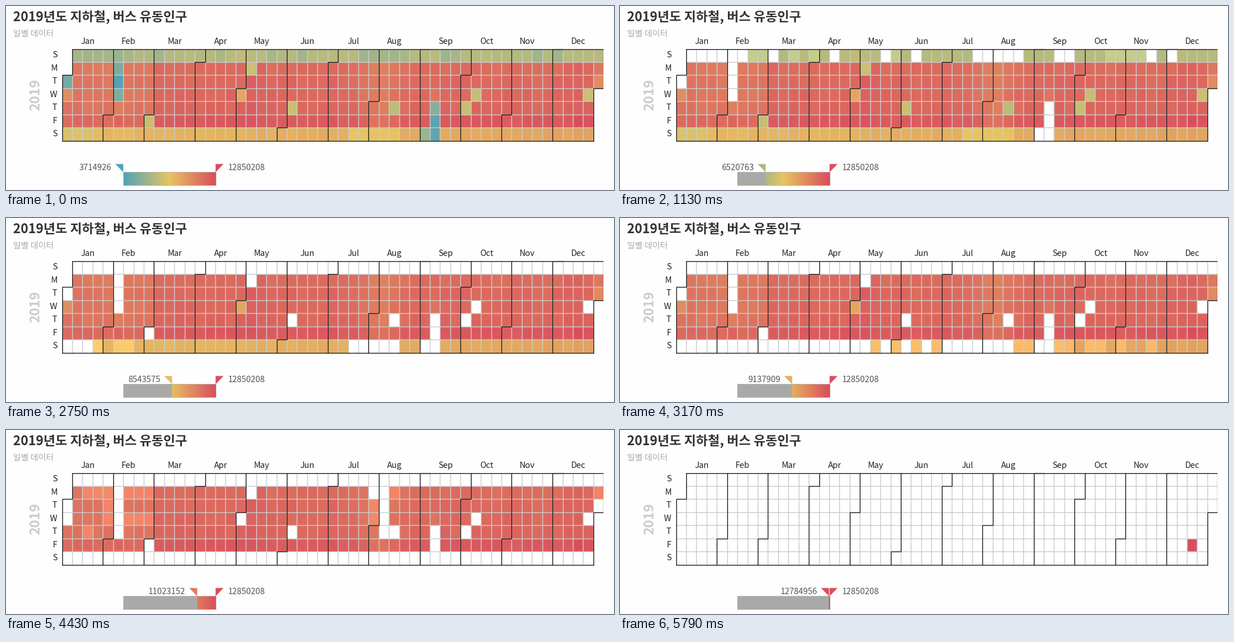
Animation, 1037 px wide and 315 px high, one loop 8000 ms. Source, as a matplotlib script:

```python
import random

import numpy as np
import matplotlib.pyplot as plt
from matplotlib.animation import FuncAnimation
from matplotlib.collections import PolyCollection
from matplotlib.colors import LinearSegmentedColormap
from matplotlib.patches import Polygon, Rectangle

W, H, DPI = 1037, 315, 100
LOOP, STEP = 8000, 40
LEFT, TOP, CW, CH, RIGHT = 95.5, 73.55, 17.43, 22.43, 1019
BAR_X, BAR_W, BAR_Y, BAR_H = 200, 157.5, 284, 23
LOW, HIGH = 3.714926, 12.850208
HOVER = 0.25
FIRST_WEEKDAY = 2

plt.rcParams["font.family"] = ["Noto Sans CJK JP", "DejaVu Sans"]
ramp = LinearSegmentedColormap.from_list(
    "flow", ["#50a3b8", "#e6c562", "#d94e5d"], N=512)

MONTHS = "Jan Feb Mar Apr May Jun Jul Aug Sep Oct Nov Dec".split()
LENGTHS = [30 + (m + m // 8) % 2 - 2 * (m == 2) for m in range(1, 13)]
STARTS = np.concatenate([[0], np.cumsum(LENGTHS)])


def date(month, day):
    return STARTS[month - 1] + day - 1


# Drops in traffic: (day, depth, half width in days)
DIPS = [(date(1, 1), 0.58, 0.85), (date(2, 5), 0.67, 1.5),
        (date(9, 13), 0.67, 1.5), (date(9, 7), 0.36, 0.6),
        (date(5, 1), 0.22, 0.6), (date(12, 31), 0.12, 1.0)]
HOLIDAYS = [(3, 1), (5, 6), (6, 6), (8, 15), (10, 3), (10, 9), (12, 25)]
DIPS += [(date(*h), 0.38, 0.6) for h in HOLIDAYS]
WEEKDAY_MEAN = [6.8, 11.72, 11.83, 11.85, 11.9, 12.38, 8.75]
RAINY_SUNDAYS = (9, 15, 20, 23, 37, 38, 46, 48)


def bump(x, center, width, power=2):
    return np.exp(-abs((x - center) / width) ** power)


def day_total(n, rng):
    """Passengers in millions on day n of the year."""
    week, day = divmod(n + FIRST_WEEKDAY, 7)
    total = WEEKDAY_MEAN[day] + rng.uniform(-0.14, 0.14)
    if day == 0:
        quiet = week < 7 or 28 < week < 34 or week in RAINY_SUNDAYS
        total += 0.25 * bump(week, 17, 3) - 0.55 * quiet
    elif day == 6:
        total += 0.016 * week - 0.9 * (week < 3 or 27 < week < 33)
    else:
        total -= 0.55 * (week < 9) + 0.85 * bump(week, 30.7, 1.9)
        total += 0.3 * (bump(week, 18, 1.3) + bump(week, 50, 1))
    for center, depth, width in DIPS:
        total *= 1 - depth * bump(n, center, width, 4)
    return np.clip(total, LOW + 0.03, 12.7)


rng = random.Random(2019)
totals = np.array([day_total(n, rng) for n in range(365)])
totals[date(2, 5)] = LOW
totals[date(12, 20)] = HIGH

# Drags of the handle: (start, end, value reached); it rests in between
DRAGS = [(280, 520, 4.98), (680, 1120, 6.520763), (1120, 1480, 7.05),
         (1520, 1720, 7.36), (1840, 1920, 7.55), (2100, 2320, 8.2),
         (2520, 2720, 8.543575), (2720, 3280, 9.3), (3340, 3720, 9.848615),
         (3720, 4160, 10.65), (4240, 4400, 11.023152),
         (4400, 4840, 12.132436), (4840, 5240, 12.72),
         (5720, 5760, 12.784956)]
key_times, key_values = [0], [LOW]
for begin, stop, value in DRAGS:
    key_times += [begin, stop]
    key_values += [key_values[-1], value]


def grid(week, day):
    return LEFT + week * CW, TOP + day * CH


def bar_pos(value):
    return BAR_X + BAR_W * (value - LOW) / (HIGH - LOW)


def tint(value):
    return ramp((value - LOW) / (HIGH - LOW))


def cell_colors(low, hovering):
    colors = tint(totals)
    if hovering:
        near = totals < low + HOVER
        colors[near, :3] = np.minimum(colors[near, :3] * 1.1, 1)
    colors[totals < low - 1e-9] = 1
    return colors


fig = plt.figure(figsize=(W / DPI, H / DPI), dpi=DPI, facecolor="#fefefe")
ax = fig.add_axes([0, 0, 1, 1])


def px(size):
    return size * 72 / DPI


def label(x, y, text, size=14.2, color="#222222", **kw):
    return ax.text(x, y, text, fontsize=px(size), color=color, **kw)


label(12, 26.5, "2019년도 지하철, 버스 유동인구", 22, "#333333", weight="bold")
label(12.5, 52, "일별 데이터", 14.4, "#aaaaaa")
label(50.5, 152, "2019", 23, "#cccccc", weight="bold", rotation=90,
      ha="center", va="center")
for row, name in enumerate("SMTWTFS"):
    label(87.5, 88 + row * 22.57, name, ha="right")

frame = Rectangle((0, 0), RIGHT, H, transform=ax.transData)
boxes = []
for n in range(365):
    w, d = divmod(n + FIRST_WEEKDAY, 7)
    boxes.append([grid(w, d), grid(w + 1, d), grid(w + 1, d + 1), grid(w, d + 1)])
days = ax.add_collection(PolyCollection(
    boxes, edgecolors="#cccccc", linewidths=px(1.3)))
days.set_clip_path(frame)


def outline(*points):
    line, = ax.plot(*zip(*points), color="#111111", lw=px(1.25),
                    solid_joinstyle="miter", zorder=3)
    line.set_clip_path(frame)


for start in STARTS:
    w, d = divmod(start + FIRST_WEEKDAY, 7)
    outline(grid(w + 1, 0), grid(w + 1, d), grid(w, d), grid(w, 7))
outline(grid(1, 0), grid(53, 0))
outline(grid(0, 7), grid(52, 7))

for name, start, length in zip(MONTHS, STARTS, LENGTHS):
    first = (start + FIRST_WEEKDAY) // 7
    last = (start + length - 1 + FIRST_WEEKDAY) // 7
    label(grid((first + last + 1) / 2, 0)[0] + 0.5, 65, name, ha="center")

ax.imshow(ramp(np.linspace(0, 1, 316))[None], aspect="auto",
          extent=(BAR_X, BAR_X + BAR_W, BAR_Y + BAR_H, BAR_Y), zorder=1)
shade = ax.add_patch(Rectangle((BAR_X, BAR_Y), 0, BAR_H, fc="#a9aaa7",
                               lw=0, zorder=2))
ax.add_patch(Rectangle((BAR_X, BAR_Y), BAR_W, BAR_H, fill=False,
                       ec="#bbbbbb", lw=px(0.8), zorder=3))


def flag(x, side):
    return [(x, 270.5), (x + 13.5 * side, 270.5), (x, 284.5)]


ax.add_patch(Polygon(flag(BAR_X + BAR_W, 1), fc=tint(HIGH), lw=0, zorder=4))
handle = ax.add_patch(Polygon(flag(BAR_X, -1), lw=0, zorder=4))
label(378.5, 281, "12850208", color="#555550")
reading = label(180, 281, "", color="#555550", ha="right")

ax.set(xlim=(0, W), ylim=(H, 0))
ax.axis("off")


def draw(i):
    t = i * STEP
    low = np.interp(t, key_times, key_values)
    x = bar_pos(low)
    days.set_facecolor(cell_colors(low, 320 <= t < 5240))
    shade.set_width(x - BAR_X)
    handle.set_xy(flag(x, -1))
    handle.set_facecolor(tint(low))
    reading.set_x(x - 20)
    reading.set_text(f"{low * 1e6:.0f}")
    return days, shade, handle, reading


anim = FuncAnimation(fig, draw, frames=LOOP // STEP, interval=STEP,
                     init_func=lambda: draw(0), repeat=True, repeat_delay=0)
plt.show()
```
